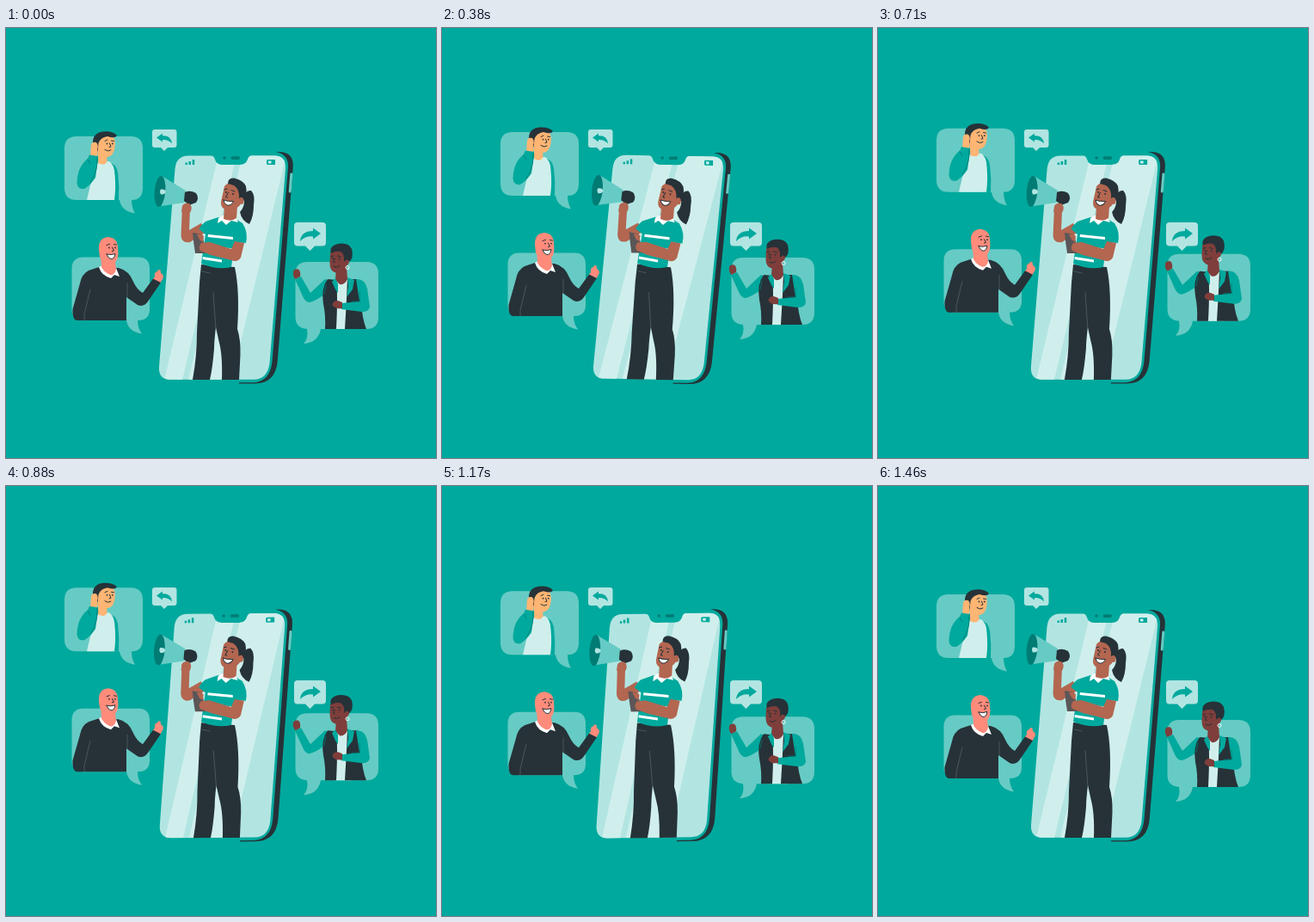
An HTML page that plays this animation: 500x500 px, repeating every 1500 ms.

```html
<!DOCTYPE html>
<html lang="en">
<head>
<meta charset="utf-8">
<title>Announcement</title>
<style>
  html, body { margin: 0; width: 100%; height: 100%; overflow: hidden; background: #00a99d; }
  svg { display: block; width: 100%; height: 100%; }
  .teal { fill: #00a99d; }
  .deep { fill: #007c74; }
  .mid { fill: #66cbc4; }
  .pale { fill: #b2e5e2; }
  .light { fill: #d0efec; }
  .dark { fill: #263238; }
  .white { fill: #fff; }
  .amber { fill: #ffb573; }
  .pink { fill: #ff8b7b; }
  .tan { fill: #b36650; }
  .brown { fill: #7f3e3b; }
  .ink, .seam, .fold { fill: none; stroke: #263238; stroke-width: 1; stroke-linecap: round; stroke-linejoin: round; }
  .seam { stroke: #007c74; stroke-width: .8; }
  .fold { stroke: #59666b; stroke-width: .7; }
</style>
</head>
<body>
<svg viewBox="0 0 500 500">
  <defs>
    <clipPath id="screen">
      <path id="glass" d="M212 148.500H239Q242 149 243 153Q245 159 251 159H272Q279 159 281 153Q282 149 285 148.500H312Q326 148.500 325 164L306.500 390Q304 408.700 288 408.700H191Q177 408.700 178 394L196.500 164Q198 148.500 212 148.500Z"/>
    </clipPath>
  </defs>

  <!-- reply badges -->
  <g class="pale">
    <path d="M173 118H195.500Q198.500 118 198.500 121V136Q198.500 139 195.500 139H188L184 143L180 139H173Q170 139 170 136V121Q170 118 173 118Z"/>
    <path d="M339 226H368Q372 226 372 230V249.500Q372 253.500 368 253.500H359L353.500 259L348 253.500H339Q335 253.500 335 249.500V230Q335 226 339 226Z"/>
  </g>
  <g class="teal">
    <path d="M175 127.500L182 122.500V125.200Q192 124.500 193 134.500Q189 129.500 182 130V132.500Z"/>
    <path d="M366 239L357 232.500V236Q343 236 342 248Q348 241.500 357 242.500V245.500Z"/>
  </g>

  <!-- listener, top left -->
  <g class="bob">
    <path class="mid" d="M82 126H145Q159 126 159 140V186Q159 200 146 200Q146 209 150 215.500Q134 213 132 200H82Q68 200 68 186V140Q68 126 82 126Z"/>
    <path class="teal" d="M118 156Q128 157 130 168Q132 184 131 200H122Z"/>
    <path class="light" d="M106 156L120 155Q126 159 126.500 170Q128 186 126 200H94L98 183Z"/>
    <path class="amber" d="M107 145H117L117.500 155Q115 161 107 157Z"/>
    <path class="amber" d="M105 129Q111 122 123 125Q128 128 126.500 139Q125 149 118 150Q109 149 106 143Z"/>
    <path class="dark" d="M101 133Q101 122 113 120.500Q124 119.500 129 125Q127 129 118 126Q110 127 107.500 134L106.500 145Z"/>
    <path class="amber" d="M99 136Q100 132 105 133Q108 137 106 141Q108 146 105 150L98 149Z"/>
    <path class="teal" d="M97 147.500L107 149Q108 154 106 160L104 174Q98 183 91 187Q83 188 82.500 180Q83 161 95 152Z"/>
    <path class="seam" d="M106 150L105.500 162Q104 171 98 180M95 153L98 158"/>
    <path class="ink" d="M115 131.500l3-1.500M122.500 131l3 .5M120.500 134l1.500 4-2 .5M115 141.500q4 3 7 .5"/>
    <g class="dark"><circle cx="117.500" cy="134.500" r=".9"/><circle cx="123.800" cy="134.500" r=".9"/></g>
  </g>

  <!-- fan, bottom left -->
  <g class="bob">
    <path class="mid" d="M90 266.500H154Q167 266.500 167 280V327Q167 340 153 340Q153 349 158 355.500Q142 353 140 340H90Q76.500 340 76.500 327V280Q76.500 266.500 90 266.500Z"/>
    <path class="pink" d="M170 293L173 289Q172 284 176 283Q177 280 179.500 281.500L180 285Q184 287 182.500 291L179 297Z"/>
    <path class="dark" d="M108 278L96 282Q88 286 86 297L77.500 327Q77 340 83 340H140V313L153 322Q160 325 165 318L180 296L171 291.500L159 308Q152 304 148 295Q143 282 131 279Z"/>
    <path class="white" d="M108 278L112 276L128 279L132 289L126 287L122 291Q111 288 108 278Z"/>
    <path class="pink" d="M110 263H126L128 281Q126 288 121 287Q114 284 111 278Z"/>
    <path class="pink" d="M108 258Q107 244 119 243Q130 244 130 256Q132 271 124 274Q113 275 109 266Z"/>
    <path class="white" d="M117 263Q122 264.500 127 262.500Q126 269 122 268.500Q119 268 117 263Z"/>
    <path class="ink" d="M117 263Q122 264.500 127 262.500Q126 269 122 268.500Q119 268 117 263ZM117 252.500l3.500-1.200M125.500 251.500l3 .5M123.500 255l2 4-2 .5"/>
    <g class="dark"><circle cx="120" cy="255.500" r=".9"/><circle cx="127" cy="255.500" r=".9"/></g>
    <path class="fold" d="M98 304L91 333V340M141 297V313"/>
  </g>

  <!-- fan, right -->
  <g class="bob">
    <path class="mid" d="M350 272H419Q433 272 433 286V336Q433 350 419 350H366Q363 366 346 367Q352 361 350 350Q336.500 349 336.500 336V286Q336.500 272 350 272Z"/>
    <path class="teal" d="M336 292L343 289L354 308L371 292L378 295L371 309Q361 317 353 319Q349 319 346 314Z"/>
    <path class="brown" d="M334 283Q335 279.500 340 280.500Q343 283 342 289L336.500 292Q333 288 334 283Z"/>
    <path class="light" d="M382 294L399 293L402 350H382Z"/>
    <path class="dark" d="M374 292L384 293Q386 310 384 350H371Q372 335 369 321Q366 303 374 292Z"/>
    <path class="dark" d="M397 292L409 292Q414 300 413 318Q414 338 419 350H394Q396 320 397 292Z"/>
    <path class="teal" d="M407 292Q417 291 420 303L423 324Q422 330 414 330L390 327V320L411 318Z"/>
    <path class="brown" d="M391 319L386 317Q380 317 379.500 322Q382 327 391 326Z"/>
    <path class="brown" d="M384 278H396L397 292Q394 299 388 298L383 293Z"/>
    <path class="teal" d="M397 290L405 293L403 304L396 313L398 300Z"/>
    <path class="teal" d="M383 291L379 295L383 304L386 308L386 297Z"/>
    <path class="brown" d="M377 262Q380 256 393 259Q400 264 398 274Q394 284 386 285Q376 284 376.500 273Z"/>
    <path class="dark" d="M378 262Q375 254 386 251Q398 249 402 257Q405 268 398 273L393 271Q394 263 389 260Q383 259 378 262Z"/>
    <circle class="brown" cx="396.500" cy="272" r="2.500"/>
    <circle cx="397" cy="278.500" r="2" fill="none" stroke="#fff" stroke-width=".9"/>
    <path class="ink" d="M378 265.500l3-.5M385.500 265l4 .8M382.500 268l-2 4 2 .5M381 277.500q4 2 7-.8"/>
    <g class="dark"><circle cx="380" cy="268" r=".9"/><circle cx="387.500" cy="268.500" r=".9"/></g>
    <path class="seam" d="M372 299L370 309M411 307L411.500 318H402"/>
  </g>

  <!-- phone and speaker -->
  <g id="phone">
    <path class="dark" d="M314 144H317Q335 144 333.700 162L315.700 388Q313 413.500 289 413.500H271V412.300H288Q307 411 309.500 388L328 162Q329 147 314 144Z"/>
    <path d="M331.800 170L330.200 190" fill="none" stroke="#66cbc4" stroke-width="3" stroke-linecap="round"/>
    <use href="#glass" class="pale"/>
    <g clip-path="url(#screen)" class="light">
      <path d="M247 148H268L205 409H184Z"/>
      <path d="M275 148H326L262 409H212Z"/>
    </g>
    <g class="deep">
      <circle cx="254" cy="151" r="1.800"/>
      <rect x="261.500" y="149.300" width="10.500" height="3.600" rx="1.800"/>
    </g>
    <g class="teal">
      <path d="M208.500 156.500h2.500v2.500h-2.500zM212.500 155h2.500v4h-2.500zM216.700 153h2.500v6h-2.500z"/>
      <path d="M304.500 153h8.500v6h-8.500q-1.500 0-1.500-1.500v-3q0-1.500 1.500-1.500z"/>
      <path class="light" d="M305 154.500h3.500v3H305z"/>
    </g>

    <path class="dark" d="M227 275L266 278Q272 306 269 350Q273 362 272.500 380L271 409H251Q252 380 247.500 364L244 348Q242 365 242 373Q240 397 237 409H217Q222 382 222 354L225 296Z"/>
    <path class="fold" d="M241 308L244 350M228 283L237 285"/>

    <path class="dark" d="M275 199Q278 188 285 189Q290 194 288 206Q288 219 283 228Q274 224 272 214Q277 209 277 201Z"/>
    <path class="tan" d="M205 207L214 211L213 235L227 227L233 237L214 249Q204 251 203.500 241Z"/>
    <path class="teal" d="M247 220L232 225Q226 230 224.500 234L232 240L227 274Q246 282 262 278L266 249L279 250Q282 238 275 227L267 222Z"/>
    <g class="white">
      <path d="M235 240L264 243V246L234.500 243Z"/>
      <path d="M232 252L263 256.500V259.500L231.500 255Z"/>
      <path d="M229 266L251 269.500V272.500L228.500 269Z"/>
    </g>
    <path class="white" d="M247 221L252 218L267 220L270 226L262 224L256 229L251 224L246 227Z"/>
    <path class="tan" d="M254 207H269L268 221Q262 226 253 222Z"/>
    <path class="tan" d="M254 184Q260 177 271 181Q278 191 274 203Q269 212 259 212Q249 211 250 202Z"/>
    <path class="dark" d="M258 181Q258 174 265 174.500Q276 177 279 184Q281 194 276 201L271 198Q272 188 265 183Z"/>
    <ellipse class="tan" cx="273.500" cy="201" rx="3" ry="4"/>
    <path class="white" d="M253 200Q258 202 264.500 201.500Q262 207 257 206Q253.500 204.500 253 200Z"/>
    <path class="ink" d="M253 200Q258 202 264.500 201.500Q262 207 257 206Q253.500 204.500 253 200ZM254 188l3-1M262 188.500l4 1.500M258.500 191.500l-3 5 2 .7"/>
    <g class="dark"><circle cx="256" cy="191" r="1"/><circle cx="264" cy="193" r="1"/></g>

    <path d="M217 238L228 240Q231 250 232 262L220 262Q218 250 217 238Z" fill="#5b5657"/>
    <path class="tan" d="M266 248L277 250L273 267Q269 273 262 270L238 264L226 259Q223 255 227 250L237 249L262 257Z"/>
    <path class="tan" d="M222 240Q227 239 230 242L229 249L225 246Z"/>

    <path class="mid" d="M181 172L209 189L208 203L181 207Z"/>
    <ellipse class="deep" cx="179" cy="190" rx="6.300" ry="18" transform="rotate(5 179 190)"/>
    <path class="pale" d="M180 187.500Q185 187 186 190.500Q185 194 180 193.500Q178 190 180 187.500Z"/>
    <path class="dark" d="M208 191Q214 188 221 192Q225 198 221 203L213 206L207 201Z"/>
    <path class="tan" d="M205 207Q207 203 213 204Q217 207 215 213L211 218L204 214Z"/>
  </g>
</svg>
<script>
  const LOOP = 1500, STEPS = 36, LIFT = 9.65, TILT = 1;
  const bobbers = document.querySelectorAll('.bob');
  const phone = document.getElementById('phone');

  // Triangle wave: 0 at whole numbers, 1 halfway between.
  const triangle = x => 1 - Math.abs(2 * (x - Math.floor(x)) - 1);

  function draw(now) {
    const step = Math.floor((now % LOOP) / LOOP * STEPS);
    const phase = step / (STEPS - 1);
    const lift = -LIFT * triangle(phase);
    const angle = TILT * (2 * triangle(phase + .25) - 1);
    bobbers.forEach(g => g.setAttribute('transform', `translate(0 ${lift})`));
    phone.setAttribute('transform', `rotate(${angle} 255 279)`);
    requestAnimationFrame(() => draw(performance.now()));
  }
  draw(performance.now());
</script>
</body>
</html>
```
